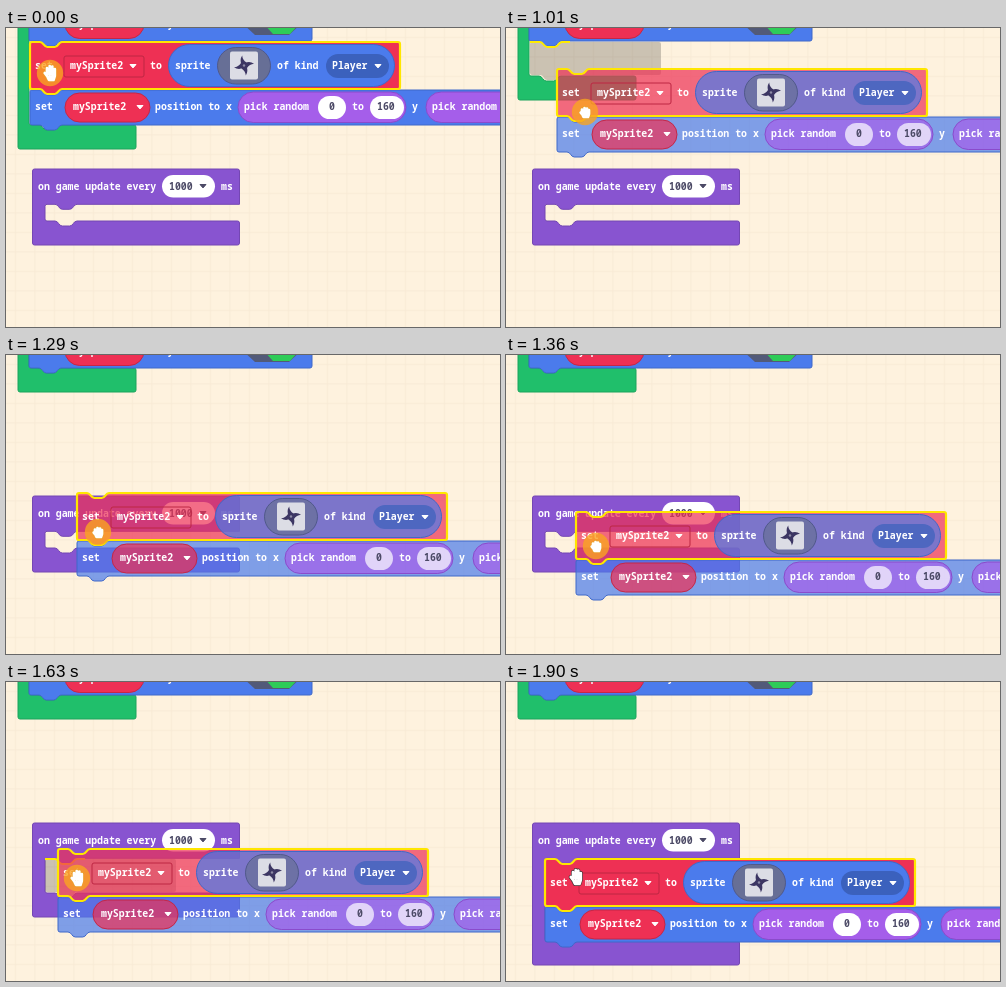
These frames come from a looping animation (494x299 px, 3.64 s). An HTML page:

```html
<!DOCTYPE html>
<html lang="en">
<head>
<meta charset="utf-8">
<title>Dragging blocks</title>
<style>
html, body { margin: 0; width: 100%; height: 100%; overflow: hidden; background: #fef2de; }
svg { display: block; width: 494px; height: 299px; }
text { font: bold 9.85px "Noto Sans Mono", "DejaVu Sans Mono", monospace; white-space: pre; }
.held path, .held rect { fill-opacity: .7; }
.held .solid, .held .solid * { fill-opacity: 1; }
</style>
</head>
<body>
<svg id="stage" viewBox="0 0 494 299"></svg>
<script>
const LOOP = 3640;
const BLUE = '#4b7bec', RED = '#ee3054', VIOLET = '#a55eea', PURPLE = '#8854d0', GREEN = '#20bf6b', INK = '#4c4a66';
const NOTCH = 'c3.6 0 3.6 5 7.3 5h7.4c3.6 0 3.6 -5 7.3 -5';
const NOTCH_BACK = 'c-3.6 0 -3.6 5 -7.3 5h-7.4c-3.6 0 -3.6 -5 -7.3 -5';

const label = (x, cy, s, fill = '#fff') => `<text x="${x}" y="${cy + 3.3}" fill="${fill}">${s}</text>`;
const box = (x, y, w, h, r, fill, stroke = 'none') =>
  `<rect x="${x}" y="${y}" width="${w}" height="${h}" rx="${r}" fill="${fill}" stroke="${stroke}"/>`;
const pill = (x, y, w, h, fill, stroke) => box(x, y, w, h, h / 2, fill, stroke);
const arrow = (x, cy, fill = '#fff') =>
  `<path class="solid" d="M${x - 3} ${cy - 1.5}h6l-3 3.4z" fill="${fill}" stroke="${fill}" stroke-linejoin="round"/>`;
const shape = (d, fill, stroke = 'none') => `<path d="${d}" fill="${fill}" stroke="${stroke}"/>`;

// Statement block with a notch on top and a tab below
const block = (x, y, w, h) =>
  `M${x} ${y + 2}q0 -2 2 -2h8${NOTCH}H${x + w - 2}q2 0 2 2v${h - 4}q0 2 -2 2H${x + 32}${NOTCH_BACK}h-8q-2 0 -2 -2z`;

// C-shaped block whose mouth lies between roof and floor
const mouth = (x, inner, top, roof, floor, right) =>
  `M${x} ${top + 2}q0 -2 2 -2H${right - 2}q2 0 2 2V${roof}H${inner + 32}${NOTCH_BACK}h-8q-2 0 -2 2` +
  `V${floor - 2}q0 2 2 2h8${NOTCH}H${right - 2}q2 0 2 2V${floor + 22}q0 2 -2 2H${x + 2}q-2 0 -2 -2z`;

const picker = (x, cy) => pill(x, cy - 15, 168, 30.5, VIOLET, '#8a4bcb') + label(x + 6, cy, 'pick random') +
  pill(x + 80, cy - 11, 28, 23, '#fff') + label(x + 91, cy, '0', INK) + label(x + 114, cy, 'to') +
  pill(x + 132, cy - 11, 34, 23, '#fff') + label(x + 139, cy, '160', INK);

const blade = 'M-2.6 -1Q-4.5 -6 -1.8 -10Q-1.5 -5.5 2.5 -3L2 0H0Z';
const star = [0, 90, 180, 270].map(a => `<path d="${blade}" transform="rotate(${a})"/>`).join('');

const topRow = shape(block(23, -22, 283, 35), BLUE, '#3f68c9') + label(29, -4, 'set') +
  pill(59, -19, 79, 29.5, RED, '#c42746') + label(67, -4, 'mySprite') + arrow(128, -4) +
  label(144, -4, 'stay in screen') +
  shape('M236 -5L249 7H283L296 -5L283 -17H249Z', '#525a78') +
  shape('M257 -5L267 6H284L294 -5L284 -16H267Z', '#2ecc58');

const dragged = shape(block(24, 62, 560, 35), BLUE, '#3f68c9') + label(29, 79, 'set') +
  pill(59, 65, 85, 29, RED, '#c42746') + label(67, 79, 'mySprite2') + arrow(134, 79) +
  label(149, 79, 'position to x') + picker(232, 79) + label(406, 79, 'y') + picker(420, 79) +
  shape(block(24, 14, 370, 47), RED) + label(29, 38, 'set') +
  box(58, 28, 80, 21, 2, 'none', '#bd2643') + label(64, 38, 'mySprite2') + arrow(127, 38) + label(144, 38, 'to') +
  pill(162.5, 16.5, 226, 42, BLUE, '#3f68c9') + label(169, 38, 'sprite') +
  pill(211.5, 19.5, 53, 36.5, '#676f96', '#50598a') +
  `<g class="solid">${box(224, 23.5, 28, 28, 2, '#dcdde5')}
    <g transform="translate(238 37.5)" fill="#3c3663">${star}<circle r="1.2" fill="#8d8ba5"/></g></g>` +
  label(271, 38, 'of kind') + pill(320, 26, 63, 24, '#3b61bd') + label(326, 38, 'Player') + arrow(372, 38);

const header = label(32, 158.5, 'on game update every') + pill(156, 147, 53, 22.5, '#fff') +
  label(163, 158.5, '1000', INK) + arrow(197, 158, INK) + label(215, 158.5, 'ms');

const marker = (id, x, y) => `<g id="${id}"><path d="${block(x, y, 131, 33)}" opacity=".2"/>
  <path d="M${x} ${y}h10${NOTCH}h8" fill="none" stroke="#ffec00" stroke-width="2"/></g>`;

stage.innerHTML = `<defs><pattern id="grid" width="19.5" height="19.5" patternUnits="userSpaceOnUse">
  <path d="M0 9.5H19.5M9.5 0V19.5" stroke="#f8ead5" stroke-width="1"/></pattern></defs>
  <rect width="494" height="299" fill="#fef2de"/><rect width="494" height="299" fill="url(#grid)"/>
  <path id="start" fill="${GREEN}" stroke="#1ba45c"/>${topRow}
  <path id="update" fill="${PURPLE}" stroke="#7447b3"/>${header}
  ${marker('startMark', 24, 14)}${marker('updateMark', 39, 177)}
  <g id="drag">${dragged}
    <path d="${block(24, 14, 370, 47)}" fill="none" stroke="#ffe600" stroke-width="2.2"/></g>
  <g id="cursor"><circle id="press" r="13.2" fill="#f9a420"/>
    <g fill="none" stroke-linecap="round" stroke-linejoin="round">
      <path id="rim" class="hand" stroke-width="4"/><path class="hand" stroke="#fff" stroke-width="2.7"/></g></g>`;

const OPEN = 'M-3 3V-5M-.3 2V-7M2.3 2V-6.5M4.8 3V-4M-3 3L-5.3 0M-3 3L-1 7H3.5L4.8 3M-1 4H3M0 6H3';
const FIST = 'M-3 2V-2.5M-.5 2V-4M2 2V-3.5M4 2V-2M-3 2L-4.3 .5M-3 2L-1.5 5H3L4 2M-1 3H2';

// time, block shift x y, pointer x y
const path = [
  [0, 0, 0, 44, 45], [870, 0, 0, 49, 48], [940, 12, 10, 64, 63], [1010, 27, 27, 79, 84],
  [1080, 36, 50, 85, 108], [1150, 42, 78, 89, 134], [1220, 45, 104, 91, 158], [1290, 47, 124, 92, 177],
  [1360, 46, 143, 90, 191], [1430, 42, 151, 86, 197], [1500, 37, 154, 80, 199], [1570, 32, 154, 75, 198],
  [1630, 28, 153, 71, 196], [1700, 26, 152, 70, 195], [1770, 15, 163, 70, 195]
];

const show = (el, on) => el.setAttribute('visibility', on ? 'visible' : 'hidden');

function draw(t) {
  const [, x, y, px, py] = path.findLast(k => k[0] <= t);
  const held = t >= 940 && t < 1770;
  const leaving = t >= 940 && t < 1080, arriving = t >= 1430 && t < 1770;
  const startFloor = t < 940 ? 97 : leaving ? 48 : 13;
  const updateFloor = t < 1430 ? 193 : arriving ? 211 : 259;

  start.setAttribute('d', mouth(12, 23, -80, -22, startFloor, 130));
  update.setAttribute('d', mouth(26.5, 39, 141, 176.3, updateFloor, 233.5));
  show(startMark, leaving);
  show(updateMark, arriving);
  drag.setAttribute('transform', `translate(${x} ${y})`);
  drag.setAttribute('class', held ? 'held' : '');
  cursor.setAttribute('transform', `translate(${px} ${py})`);
  press.setAttribute('opacity', t < 1770 ? .8 : t < 1900 ? .4 : 0);
  rim.setAttribute('stroke', t < 1770 ? '#e8a02c' : '#3a3030');
  const hand = t >= 870 && t < 1430 ? FIST : OPEN;
  for (const h of document.querySelectorAll('.hand')) h.setAttribute('d', hand);
}

const begin = performance.now();
function tick() {
  draw((performance.now() - begin) % LOOP);
  requestAnimationFrame(tick);
}
tick();
</script>
</body>
</html>
```
